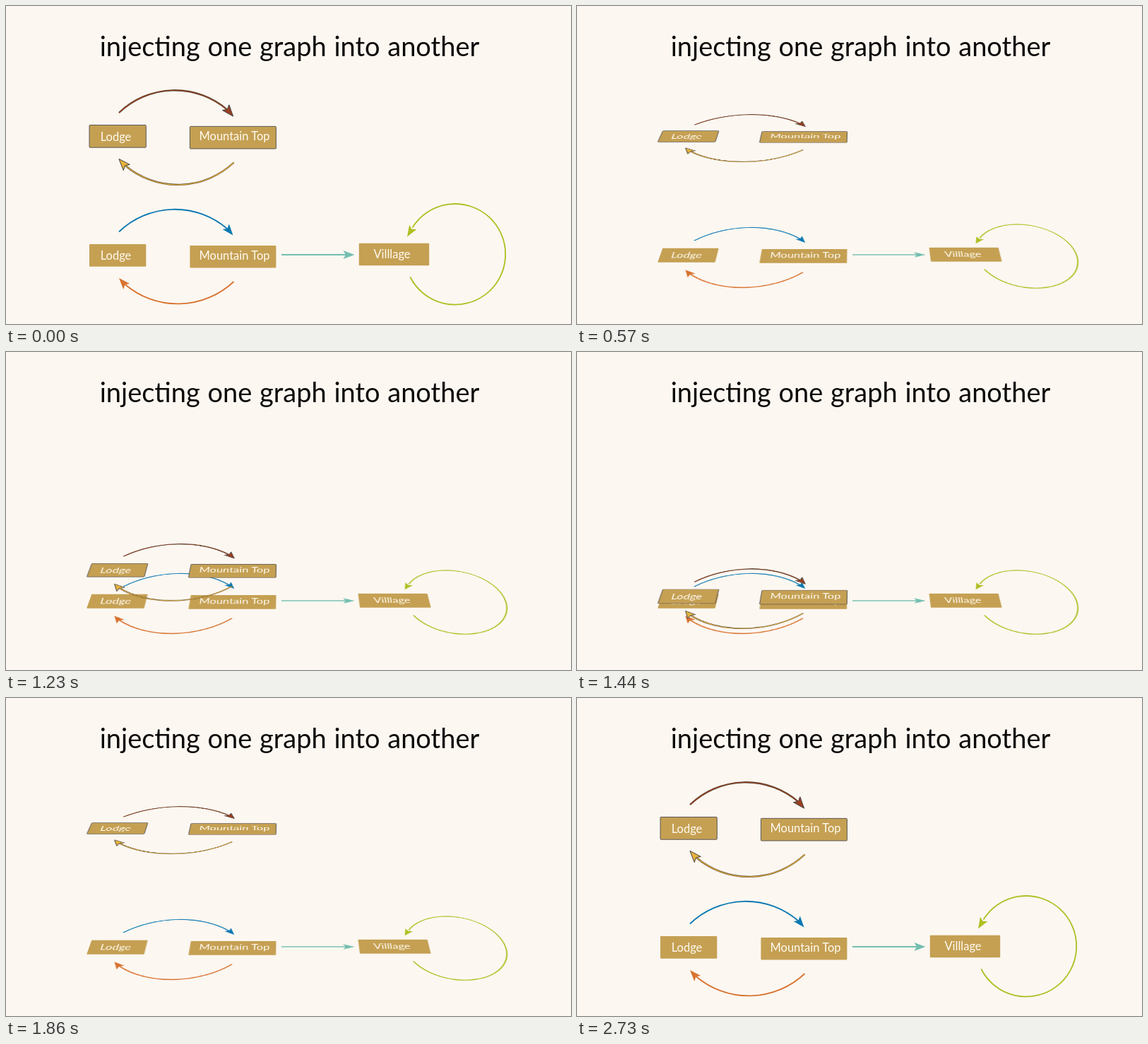
An HTML page that plays this animation: 800 by 450 pixels, repeating every 2850 ms.

```html
<!DOCTYPE html>
<html lang="en">
<head>
<meta charset="utf-8">
<title>injecting one graph into another</title>
<style>
  html, body { margin: 0; width: 100%; height: 100%; overflow: hidden; background: #fcf7f1; }
  .stage { position: relative; width: 800px; height: 450px; overflow: hidden; perspective: 1060px; perspective-origin: 400px 225px; }
  svg { position: absolute; left: 0; top: 0; width: 800px; height: 450px; overflow: visible; }
  #upper { transform-origin: 400px 184.5px; }
  #lower { transform-origin: 400px 352px; }
  text { font-family: Lato, "Open Sans", sans-serif; text-anchor: middle; }
  .title { font-size: 38px; word-spacing: 1px; fill: #0c0a09; }
  .label { font-size: 16.5px; fill: #fffaf0; }
  .box { fill: #c5a053; stroke: var(--edge, none); stroke-width: .9; }
  .line { fill: none; stroke: currentColor; stroke-width: var(--w, 1.8); }
  .head { fill: currentColor; stroke: var(--edge, none); stroke-width: .8; stroke-linejoin: round; }
  #upper { --edge: #4c4a4c; --w: 1.1; }
  .rim { color: #53412f; --w: 2.3; }
</style>
</head>
<body>
<div class="stage">
  <svg viewBox="0 0 800 450">
    <defs>
      <path id="tip" class="head" d="M0 0L-16 -6L-12.5 0L-16 6Z"/>
      <g id="over">
        <path class="line" d="M160 151A114 114 0 0 1 313.5 147"/>
        <use href="#tip" transform="translate(321.5 156) rotate(50)"/>
      </g>
      <g id="under">
        <path class="line" d="M322.5 221.5A115.5 115.5 0 0 1 168.5 225.5"/>
        <use href="#tip" transform="translate(160 216.5) rotate(-132)"/>
      </g>
      <g id="nodes">
        <rect class="box" x="118" y="168.5" width="80.3" height="31.7" rx="1"/>
        <rect class="box" x="260.4" y="170.4" width="122" height="31.6" rx="1"/>
        <text class="label" x="155.5" y="190.7">Lodge</text>
        <text class="label" x="323.5" y="190.3">Mountain Top</text>
      </g>
    </defs>
    <text class="title" x="401.5" y="71">injecting one graph into another</text>
  </svg>

  <svg id="lower" viewBox="0 0 800 450">
    <g transform="translate(0 168.5)">
      <use href="#over" color="#0b78b2"/>
      <use href="#under" color="#d8722f"/>
      <use href="#nodes"/>
    </g>
    <g color="#74bfb0">
      <path class="line" d="M390 352H481"/>
      <use href="#tip" transform="translate(493.5 352)"/>
    </g>
    <g color="#afbf22">
      <path class="line" d="M572.3 383.5A71.3 71.3 0 1 0 575.5 313.5"/>
      <use href="#tip" transform="translate(568 326.5) rotate(121)"/>
    </g>
    <rect class="box" x="499.8" y="335.8" width="99.4" height="31.4" rx="1"/>
    <text class="label" x="546.5" y="357.3">Villlage</text>
  </svg>

  <svg id="upper" viewBox="0 0 800 450">
    <use href="#over" class="rim"/>
    <use href="#over" color="#9a4020"/>
    <use href="#under" class="rim"/>
    <use href="#under" color="#e8b43c"/>
    <use href="#nodes"/>
  </svg>
</div>
<script>
  const LOOP = 2850, STEP = 30, TILT = 58, DROP = 168.5;
  const upper = document.getElementById('upper');
  const lower = document.getElementById('lower');

  // sine ease in-out from 0 to 1 between two times
  const ease = (t, from, to) => {
    const x = Math.min(1, Math.max(0, (t - from) / (to - from)));
    return (1 - Math.cos(Math.PI * x)) / 2;
  };

  function draw(ms) {
    // motion advances in fixed steps; the small bias absorbs timer jitter
    const t = Math.floor(ms / STEP + 0.1) * STEP % LOOP;
    const tilt = TILT * (ease(t, 0, 570) - ease(t, 2250, 2730));
    const drop = DROP * (ease(t, 950, 1376) - ease(t, 1376, 1860));
    lower.style.transform = `rotateX(${tilt}deg)`;
    upper.style.transform = `translateY(${drop}px) rotateX(${tilt}deg)`;
  }

  const start = performance.now();
  function tick() {
    draw(performance.now() - start);
    requestAnimationFrame(tick);
  }
  tick();
</script>
</body>
</html>
```
